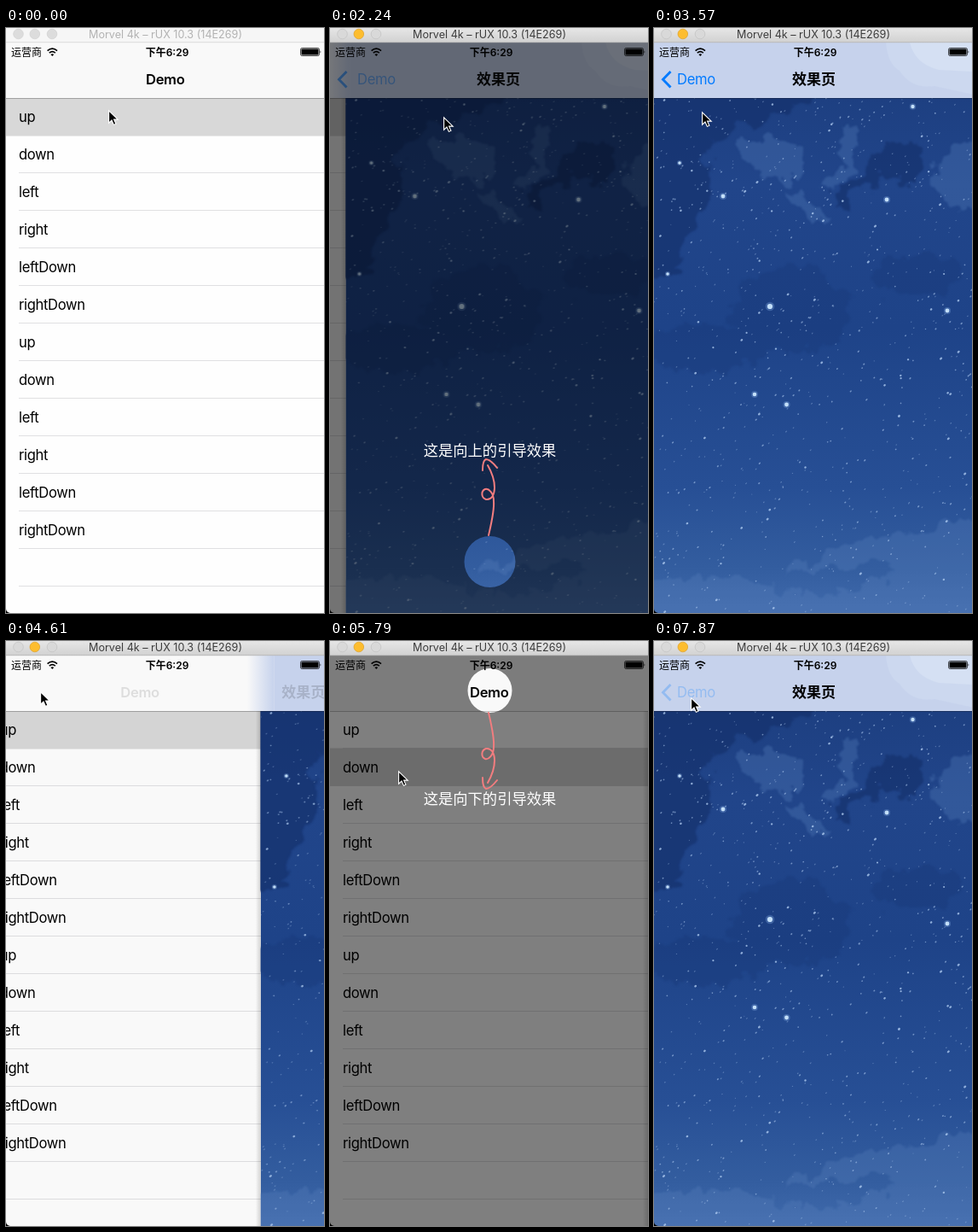
An HTML page that plays this animation: 373x685 px, repeating every 8000 ms.

```html
<!DOCTYPE html>
<html lang="zh">
<head>
<meta charset="utf-8">
<title>Demo</title>
<style>
  html, body { margin: 0; width: 100%; height: 100%; overflow: hidden; background: #fff; }
  svg { display: block; width: 100vw; height: 100vh; }
  text { font-family: Inter, 'Noto Sans CJK SC', 'Noto Sans CJK', sans-serif; }
  .latin { font-size: 16.6px; letter-spacing: -.35px; }
  .bold { font-weight: 600; }
  .mid { text-anchor: middle; }
  .status { font-size: 12px; }
  .heading { font-size: 17px; }
  .hint { font-size: 17.3px; fill: #fff; }
  .tint { fill: #007aff; }
  .ink { fill: none; stroke: #f27d7f; stroke-width: 2; stroke-linecap: round; stroke-linejoin: round; }
  .star { fill: none; stroke: #b4d0f4; stroke-linecap: round; }
</style>
</head>
<body>
<svg viewBox="0 0 373 685" preserveAspectRatio="none">
  <defs>
    <linearGradient id="sky" x2="0" y2="1">
      <stop offset="0" stop-color="#1b3c7c"/>
      <stop offset=".25" stop-color="#21458a"/>
      <stop offset=".5" stop-color="#1e4388"/>
      <stop offset=".78" stop-color="#274f95"/>
      <stop offset=".92" stop-color="#335d9f"/>
      <stop offset="1" stop-color="#406aac"/>
    </linearGradient>
    <linearGradient id="edge">
      <stop offset="0" stop-color="#c6d2ec" stop-opacity="0"/>
      <stop offset="1" stop-color="#c6d2ec"/>
    </linearGradient>
    <linearGradient id="shade">
      <stop offset="0" stop-opacity="0"/>
      <stop offset="1" stop-opacity=".16"/>
    </linearGradient>
    <linearGradient id="chrome" x2="0" y2="1">
      <stop offset="0" stop-color="#e6e6e6"/>
      <stop offset="1" stop-color="#d1d1d1"/>
    </linearGradient>
    <filter id="rough" filterUnits="userSpaceOnUse" x="-20" y="0" width="413" height="700" color-interpolation-filters="sRGB">
      <feTurbulence type="fractalNoise" baseFrequency=".045" numOctaves="4" seed="5"/>
      <feDisplacementMap in="SourceGraphic" scale="34" xChannelSelector="R" yChannelSelector="G"/>
      <feGaussianBlur stdDeviation=".8"/>
    </filter>
    <clipPath id="pageClip"><rect y="17" width="373" height="668"/></clipPath>
    <clipPath id="barClip"><rect y="17" width="373" height="65"/></clipPath>
  </defs>

  <rect y="17" width="373" height="668" fill="#fff"/>
  <g id="list"></g>
  <rect id="veil" y="82" width="373" height="603"/>

  <g id="page">
    <rect x="-6" y="82" width="6" height="603" fill="url(#shade)"/>
    <g clip-path="url(#pageClip)">
      <rect y="17" width="373" height="668" fill="url(#sky)"/>
      <g filter="url(#rough)">
        <g fill="#142f6a" opacity=".62">
          <path d="M-20 70H190Q175 105 120 112T60 150Q78 200 52 225T30 275T-20 290Z"/>
          <path d="M206 204L240 174L258 146Q285 128 318 142Q322 164 300 178L262 176L224 206Z"/>
        </g>
        <g fill="#4a72b0" opacity=".42">
          <path d="M98 140Q130 118 168 140Q182 165 160 180Q120 182 98 140Z"/>
          <path d="M196 190Q200 165 222 158Q212 120 236 106Q244 140 228 172Q220 200 196 190Z"/>
          <path d="M328 176Q340 130 385 128V212Q345 220 328 176Z"/>
          <path d="M150 190Q190 200 210 226Q180 232 150 190Z"/>
        </g>
        <g fill="#183876" opacity=".35">
          <ellipse cx="160" cy="330" rx="70" ry="50"/>
          <ellipse cx="60" cy="375" rx="70" ry="28"/>
          <ellipse cx="310" cy="290" rx="55" ry="24"/>
        </g>
        <g fill="#6089c2" opacity=".26">
          <path d="M-20 655Q60 630 140 655T270 640T400 590V710H-20Z"/>
          <path d="M150 640Q230 590 390 575V625Q260 620 150 640Z"/>
        </g>
      </g>
      <g id="stars"></g>
    </g>
  </g>

  <rect y="17" width="373" height="65" fill="#f9f9f9"/>
  <g clip-path="url(#barClip)">
    <g id="bar">
      <rect x="-16" y="17" width="32" height="65" fill="url(#edge)"/>
      <rect x="16" y="17" width="400" height="65" fill="#c6d2ec"/>
      <path d="M288 17Q290 42 304 50Q318 72 345 68L410 82V17Z" fill="#ccd8ef"/>
      <path d="M316 17Q322 42 350 49L410 52V17Z" fill="#d5e0f3"/>
    </g>
  </g>
  <rect y="82" width="373" height=".8" fill-opacity=".32"/>

  <g class="status">
    <text x="6" y="32.5">运营商</text>
    <text x="189" y="32.5" class="mid bold">下午6:29</text>
    <g fill="none" stroke="#000" stroke-width="1.7">
      <path d="M48.6 26.6Q54.3 21.6 60 26.6M50.8 29.1Q54.3 26 57.8 29.1"/>
    </g>
    <path d="M52.4 30.9Q54.3 29.4 56.2 30.9L54.3 33Z"/>
    <rect x="345.5" y="23.5" width="22" height="9" rx="1.8" fill="none" stroke="#000" stroke-width=".7"/>
    <rect x="346.5" y="24.5" width="20" height="7" rx=".8"/>
    <path d="M368.6 26.2Q370.2 28 368.6 29.8Z"/>
  </g>
  <text id="demo" y="66" class="latin bold">Demo</text>
  <text id="title" y="66" class="heading mid bold">效果页</text>
  <g id="back">
    <path id="chevron" d="M19.5 51L10.5 60.2L19.5 69.4" fill="none" stroke="#007aff" stroke-width="2.9"/>
    <text id="label" y="66" class="latin tint">Demo</text>
  </g>

  <g id="guide">
    <path id="mask" fill-rule="evenodd" fill-opacity=".5"/>
    <g id="arrow" class="ink">
      <path d="M186 84C189 97 193 113 192 124C192 134 186 139 182 138C177 136 177 128 183 126C189 125 193 131 193 140C193 151 189 159 185 166"/>
      <path d="M179 160C179 166 180 172 183 173C187 173 192 168 196 163"/>
    </g>
    <text id="hint" x="187.5" class="hint mid"></text>
  </g>

  <path d="M0 680V685H5A5 5 0 0 1 0 680Z"/>
  <rect id="frame" width="373" height="17"/>
  <rect id="rim" y="16.4" width="373" height=".8"/>
  <g id="lights" stroke-width=".7">
    <circle cx="14.5" cy="7" r="5.8"/>
    <circle cx="33.8" cy="7" r="5.8"/>
    <circle cx="54" cy="7" r="5.8"/>
  </g>
  <text id="caption" x="187" y="11.6" class="mid" font-size="12.6">Morvel 4k – rUX 10.3 (14E269)</text>
  <path id="cursor" d="M.6 .8V15.2L4 12L6.4 17.4L8.9 16.3L6.6 11.1H11.2Z" stroke="#fff" stroke-width="1.1"/>
</svg>

<script>
const $ = id => document.getElementById(id);
const set = (el, attrs) => { for (const k in attrs) el.setAttribute(k, attrs[k]); };
const add = (parent, tag, attrs, text) => {
  const el = document.createElementNS('http://www.w3.org/2000/svg', tag);
  set(el, attrs);
  if (text) el.textContent = text;
  return parent.appendChild(el);
};
const clamp = v => Math.max(0, Math.min(1, v));

const LOOP = 8000, W = 373;
// Moments at which the screen refreshes
const TICKS = [0, 150, 900, 1050,
  1950, 2100, 2240, 2390, 2540, 2690, 2840, 2980, 3130, 3280, 3430, 3570,
  3870, 4020, 4170, 4310, 4460, 4610, 4750, 4900, 5050, 5200, 5350,
  5790, 5940, 6090, 6240, 6390, 7280, 7430, 7580, 7720, 7870];
// Pointer path: time, x, y
const POINTER = [[0, 120, 96], [150, 128, 101], [900, 130, 102], [1050, 133, 104],
  [2690, 133, 104], [3570, 56, 98], [3870, 56, 98], [4310, 40, 59], [4610, 40, 59],
  [4900, 42, 102], [5350, 80, 152], [7280, 80, 152], [7870, 43, 66], [LOOP, 43, 66]];

// List rows
const NAMES = ['up', 'down', 'left', 'right', 'leftDown', 'rightDown'];
const list = $('list');
add(list, 'rect', { y: 17, width: W, height: 668, fill: '#fefefe' });
for (let i = 0; i < 13; i++)
  add(list, 'rect', { x: 15, y: 125 + 44 * i, width: W, height: 1, fill: '#e0e0e2' });
const mark = add(list, 'rect', { width: W, height: 44.5, fill: '#d8d8d8' });
for (let i = 0; i < 12; i++)
  add(list, 'text', { x: 15, y: 110 + 44 * i, class: 'latin' }, NAMES[i % 6]);

// Starfield
let seed = 11;
const rnd = () => (seed = seed * 16807 % 2147483647) / 2147483647;
function scatter(count, width, alpha) {
  let d = '';
  for (let i = 0; i < count; i++) {
    const x = rnd() * W, y = 82 + 603 * Math.pow(rnd(), 1.15), s = rnd() * .9;
    d += `M${x.toFixed(1)} ${y.toFixed(1)}l${s.toFixed(1)} ${(-s).toFixed(1)}`;
  }
  add($('stars'), 'path', { d, class: 'star', 'stroke-width': width, 'stroke-opacity': alpha });
}
scatter(560, 1.1, .36);
scatter(260, 1.5, .55);
scatter(60, 2.2, .75);
for (const [x, y, r] of [[81, 197, 2.4], [273, 201, 2.4], [303.5, 92, 2.2], [136, 326, 3.1],
  [344, 331, 2.4], [118, 429, 2.3], [155.5, 441, 2.4], [16, 288, 1.8], [30, 158, 1.8]]) {
  add($('stars'), 'circle', { cx: x, cy: y, r: r * 1.7, fill: '#8fb6ec', opacity: .3 });
  add($('stars'), 'circle', { cx: x, cy: y, r, fill: '#c4e0fa' });
}

function pointer(t) {
  const i = POINTER.findIndex(p => p[0] > t);
  const [t0, x0, y0] = POINTER[i - 1], [t1, x1, y1] = POINTER[i];
  const k = (t - t0) / (t1 - t0);
  return [x0 + (x1 - x0) * k, y0 + (y1 - y0) * k];
}

// Remaining share of a critically damped slide
function rest(ms) {
  const w = ms * .0164;
  return w > 7.5 ? 0 : (1 + w) * Math.exp(-w);
}

function pageX(t) {
  if (t < 1950) return 400;
  if (t < 4427) return W * rest(t - 1950);
  if (t < 4900) return W * (1 - rest(t - 4427));
  if (t < 5790) return 400;
  return W * rest(t - 5790);
}

function guideAlpha(t) {
  if (t < 1950 || (t >= 3500 && t < 5790)) return 0;
  return 1 - clamp((t - (t < 4000 ? 2690 : 7280)) / 400);
}

function hole(cy, r) {
  return `M0 17H373V685H0ZM${187.5 - r} ${cy}a${r} ${r} 0 1 0 ${2 * r} 0a${r} ${r} 0 1 0 ${-2 * r} 0Z`;
}

function windowChrome(active) {
  set($('frame'), { fill: active ? 'url(#chrome)' : '#f6f6f6' });
  set($('rim'), { fill: active ? '#b4b4b4' : '#d4d4d4' });
  set($('caption'), { fill: active ? '#3c3c3c' : '#b2b2b2' });
  [...$('lights').children].forEach((c, i) => set(c, active
    ? (i === 1 ? { fill: '#fdbd2f', stroke: '#dfa023' } : { fill: '#d9d9d9', stroke: '#c2c2c2' })
    : { fill: '#dcdcdc', stroke: '#d0d0d0' }));
}

function draw(t) {
  const x = pageX(t), q = clamp(x / W), up = t < 5000;
  windowChrome(t >= 1950);

  set(list, { transform: `translate(${-112 * (1 - q)})` });
  set(mark, {
    y: up ? 82 : 125.5,
    opacity: up ? 1 - clamp((t - 4610) / 290) : +(t >= 5790)
  });
  set($('veil'), { 'fill-opacity': .1 * (1 - q) });
  set($('page'), { transform: `translate(${x})` });

  set($('bar'), {
    transform: `translate(${x - Math.max(0, 16 - x / 4)})`,
    opacity: x < W ? 1 : 0
  });
  const shift = 137 * Math.pow(q, 1.1);
  set($('demo'), { x: 27 + shift, opacity: clamp(1 - (1 - q) * 4.5) });
  set($('label'), { x: 27 + shift, opacity: clamp(1 - q * 11) });
  set($('chevron'), { opacity: clamp(1 - q * 8) });
  set($('title'), { x: 187.5 + .54 * x, opacity: Math.pow(1 - q, 1.2) });
  const pressed = t >= 7870 || (t >= 4310 && t < 4900);
  set($('back'), { opacity: pressed ? .25 : 1 });

  set($('guide'), { opacity: guideAlpha(t) });
  set($('mask'), { d: up ? hole(625, 30) : hole(58, 26) });
  set($('arrow'), { transform: up ? 'matrix(1 0 0 -1 0 678)' : 'translate(0)' });
  set($('hint'), { y: up ? 500.5 : 190.5 });
  $('hint').textContent = `这是向${up ? '上' : '下'}的引导效果`;

  set($('cursor'), { transform: `translate(${pointer(t)})` });
}

const start = performance.now();
let last = -1;
function loop() {
  const now = (performance.now() - start) % LOOP;
  const tick = TICKS.filter(v => v <= now).pop();
  if (tick !== last) draw(last = tick);
  requestAnimationFrame(loop);
}
loop();
</script>
</body>
</html>
```
